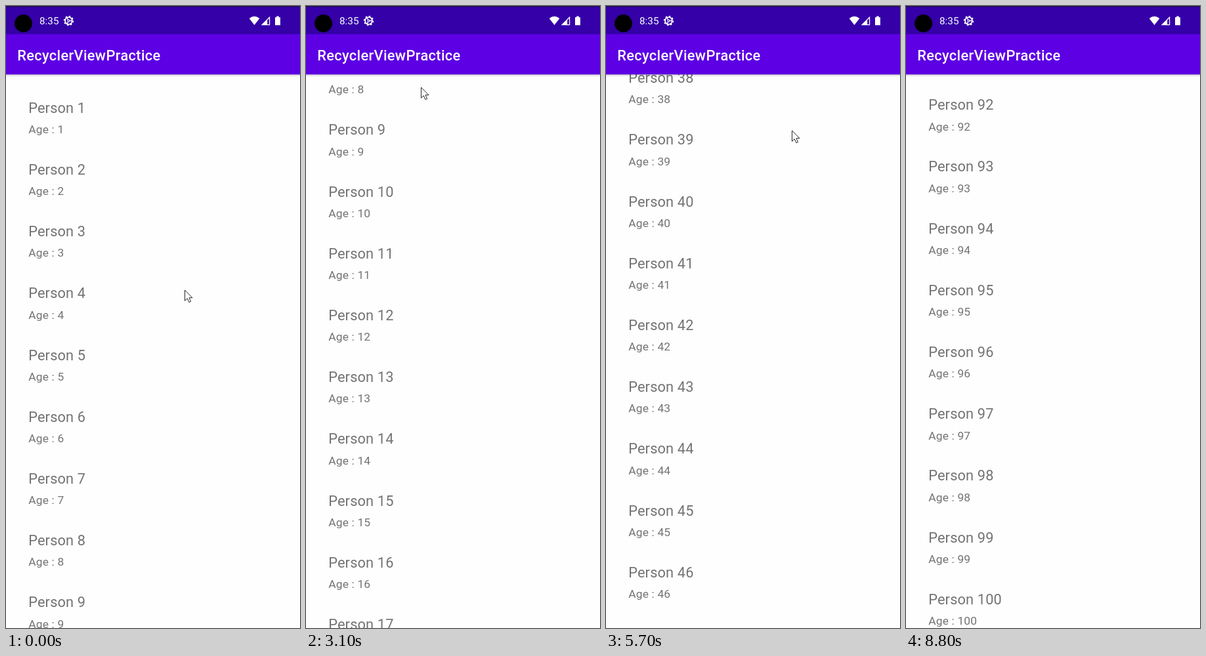
Recreate the animation shown at these times as an HTML page. Size 448x948 px, loop 8.9 s.

```html
<!DOCTYPE html>
<html lang="en">
<head>
<meta charset="utf-8">
<style>
  html, body { margin: 0; width: 100%; height: 100%; overflow: hidden; background: #fefefe; }
  svg { display: block; width: 100vw; height: 100vh; }
  text { font-family: Roboto, sans-serif; }
  .name { font-size: 21.8px; letter-spacing: .006em; }
  .age { font-size: 17.4px; letter-spacing: .01em; }
  #rows { fill: #737373; }
</style>
</head>
<body>
<svg viewBox="0 0 448 948">
  <defs>
    <linearGradient id="shade" x2="0" y2="1">
      <stop offset="0" stop-color="#000" stop-opacity=".26"/>
      <stop offset=".4" stop-color="#000" stop-opacity=".08"/>
      <stop offset="1" stop-color="#000" stop-opacity="0"/>
    </linearGradient>
  </defs>
  <rect width="448" height="948" fill="#fefefe"/>
  <g id="rows"></g>
  <rect y="104" width="448" height="5" fill="url(#shade)"/>
  <rect y="43" width="448" height="61.3" fill="#5d00e4"/>
  <rect width="448" height="43" fill="#3500a8"/>
  <rect width="448" height="1.5" fill="#211052"/>
  <circle cx="26.5" cy="26.5" r="13.5"/>
  <g fill="#fff">
    <text x="51" y="28" font-size="15.3">8:35</text>
    <text x="17.2" y="82.5" font-size="21.8" font-weight="500" letter-spacing=".34">RecyclerViewPractice</text>
    <g transform="translate(95.5 22.5)" fill="none" stroke="#fff">
      <circle r="5.4" stroke-width="1.8"/>
      <circle r="6.8" stroke-width="1.8" stroke-dasharray="2.6 2.741"/>
      <circle r="1.5" stroke-width="1.2"/>
      <path d="M1.5 0H5M-.8 1.3L-2.5 4.4M-.8-1.3L-2.5-4.4" stroke-width="1.4"/>
    </g>
    <path d="M378.5 29L370.7 18.9Q378.5 12.6 386.3 18.9Z"/>
    <path d="M388.7 29.2L402.2 15.7V29.2ZM398.2 21.6V27.9H400.9V18.9Z" fill-rule="evenodd"/>
    <path d="M410 17.2H412.2V15.6H415.8V17.2H418V29.2H410Z"/>
  </g>
  <path id="cursor" d="M0 0V16.2L3.8 12.7L6.4 18.6L9 17.4L6.5 11.7H11.5Z" fill="#fff" stroke="#000" stroke-width=".85" stroke-linejoin="round"/>
</svg>
<script>
const LOOP = 8900, STEP = 100, PITCH = 94.2, COUNT = 100, END = 8576.7;
const rowsEl = document.getElementById('rows');
const cursor = document.getElementById('cursor');

function addText(parent, cls, y) {
  const el = document.createElementNS('http://www.w3.org/2000/svg', 'text');
  el.setAttribute('class', cls);
  el.setAttribute('x', 34.2);
  el.setAttribute('y', y);
  return parent.appendChild(el);
}

const rows = Array.from({ length: 11 }, () => {
  const g = rowsEl.appendChild(document.createElementNS('http://www.w3.org/2000/svg', 'g'));
  return { g, name: addText(g, 'name', 58.3), age: addText(g, 'age', 89.5) };
});

// time, x, y of the pointer tip
const path = [
  [0, 272.5, 433], [300, 282, 455], [700, 280, 510], [1000, 271, 529],
  [1600, 224.5, 295], [1900, 209, 243], [2550, 175.5, 124], [3100, 175.5, 124],
  [3600, 238, 430], [4300, 243.5, 734], [5100, 243.5, 734], [5300, 255, 602],
  [5500, 273, 320], [5700, 283.5, 190], [5950, 291, -30]
];

// time, scroll offset while the list is dragged
const drag = [[1000, 0], [1600, 259], [1900, 311], [2550, 430]];

function along(keys, t, i = 1) {
  let k = 1;
  while (k < keys.length - 1 && t > keys[k][0]) k++;
  const a = keys[k - 1], b = keys[k];
  const p = Math.min(1, Math.max(0, (t - a[0]) / (b[0] - a[0])));
  return a[i] + (b[i] - a[i]) * p;
}

// Friction curve of a flung list: solve the time curve, then read the distance
function fling(p) {
  if (p >= 1) return 1;
  let lo = 0, hi = 1, x = 0;
  for (let i = 0; i < 24; i++) {
    x = (lo + hi) / 2;
    const time = 3 * x * (1 - x) * ((1 - x) * .175 + x * .935) + x ** 3;
    if (time < p) lo = x; else hi = x;
  }
  return 3 * x * (1 - x) * ((1 - x) * .5 + x) + x ** 3;
}

function scrollAt(t) {
  if (t < 2550) return along(drag, t);
  if (t < 5100) return 430 + 322 * fling((t - 2550) / 670);
  if (t < 5300) return 752 + 132 * (t - 5100) / 200;
  return Math.min(END, 884 + 7753 * fling((t - 5300) / 2000));
}

function draw(t) {
  const scroll = scrollAt(t);
  const first = Math.floor(scroll / PITCH);
  rows.forEach((row, i) => {
    const n = first + i + 1;
    row.g.setAttribute('transform', `translate(0 ${104.5 + (n - 1) * PITCH - scroll})`);
    row.g.setAttribute('visibility', n > COUNT ? 'hidden' : 'visible');
    row.name.textContent = `Person ${n}`;
    row.age.textContent = `Age : ${n}`;
  });
  cursor.setAttribute('transform', `translate(${along(path, t)} ${along(path, t, 2)})`);
}

const start = performance.now();
function tick() {
  const t = (performance.now() - start) % LOOP;
  draw(Math.floor(t / STEP) * STEP);
  requestAnimationFrame(tick);
}
tick();
</script>
</body>
</html>
```
